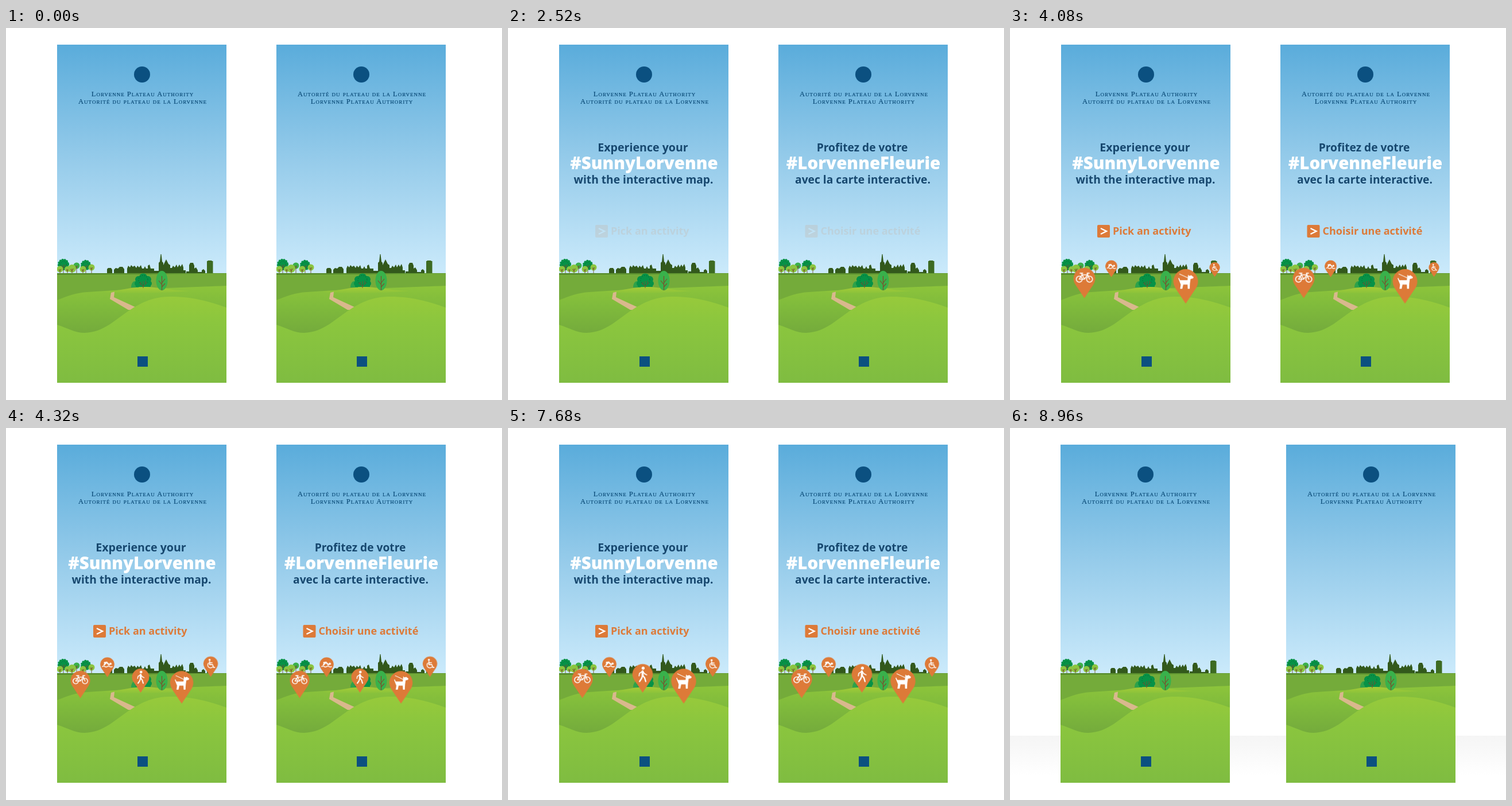
An HTML page for the animation above (10 s loop, 864 by 648 pixels).

```html
<!DOCTYPE html>
<html lang="en">
<head>
<meta charset="utf-8">
<title>Interactive map banners</title>
<style>
html, body { margin: 0; width: 100%; height: 100%; overflow: hidden; background: #fff; }
svg { display: block; width: 864px; height: 648px; }
text { text-anchor: middle; font-family: "Open Sans", "Noto Sans", sans-serif; font-weight: 700; fill: #17486f; }
.head { font: 12.5px "Liberation Serif", "Noto Serif", serif; font-variant: small-caps; letter-spacing: 1px; fill: #0a4a77; stroke: #0a4a77; stroke-width: .2px; }
.tag { font-size: 29.5px; font-weight: 800; fill: #fff; }
.pick { font-size: 18px; text-anchor: start; fill: #dd7a38; }
.icon { fill: none; stroke: #fff; stroke-linecap: round; stroke-linejoin: round; }
.icon .solid { fill: #fff; stroke: none; }

.title, .button, .out, .in, .left, .right, .floor { animation: 10s step-end infinite both; }
.title { animation-name: title; }
.button { animation-name: button; }
.out { animation-name: out; }
.in { animation-name: pop; }
.left { animation-name: left; }
.right { animation-name: right; }
.floor { animation-name: floor; }

@keyframes title {
  0% { opacity: 0; }
  2% { opacity: 0; animation-timing-function: steps(8); }
  5.2% { opacity: 1; }
  76.8% { opacity: 1; animation-timing-function: steps(10); }
  80.8%, 100% { opacity: 0; }
}
@keyframes button {
  0% { opacity: 0; }
  24.8% { opacity: 0; animation-timing-function: steps(8); }
  28% { opacity: 1; }
  76.8% { opacity: 1; animation-timing-function: steps(10); }
  80.8%, 100% { opacity: 0; }
}
/* one 40 ms tick is .4% of the loop */
@keyframes pop {
  0% { transform: scale(0); }
  .4% { transform: scale(.3); }
  .8% { transform: scale(.58); }
  1.2% { transform: scale(.78); }
  1.6% { transform: scale(.9); }
  2% { transform: scale(1.03); }
  2.4% { transform: scale(1.09); }
  2.8% { transform: scale(1.11); }
  3.2% { transform: scale(1.11); }
  3.6% { transform: scale(1.09); }
  4% { transform: scale(1.06); }
  4.4% { transform: scale(1.03); }
  4.8%, 100% { transform: scale(1); }
}
@keyframes out {
  0% { transform: scale(0); }
  36.8% { transform: scale(1); }
  76.8% { transform: scale(1.07); }
  77.2% { transform: scale(1.11); }
  77.6% { transform: scale(1.1); }
  78% { transform: scale(1.05); }
  78.4% { transform: scale(.96); }
  78.8% { transform: scale(.84); }
  79.2% { transform: scale(.68); }
  79.6% { transform: scale(.48); }
  80% { transform: scale(.27); }
  80.4% { transform: scale(.1); }
  80.8%, 100% { transform: scale(0); }
}
@keyframes left { 0% { transform: none; } 89.6%, 100% { transform: translate(-1px, 0); } }
@keyframes right { 0% { transform: none; } 89.6%, 100% { transform: translate(10px, 0); } }
@keyframes floor { 0% { opacity: 0; } 89.6%, 100% { opacity: 1; } }
</style>
</head>
<body>
<svg viewBox="0 0 864 648">
  <defs>
    <linearGradient id="sky" gradientUnits="userSpaceOnUse" x1="0" y1="29" x2="0" y2="428">
      <stop stop-color="#5aacdb"/><stop offset=".5" stop-color="#95cbea"/><stop offset="1" stop-color="#cbeafb"/>
    </linearGradient>
    <linearGradient id="mid" gradientUnits="userSpaceOnUse" x1="0" y1="450" x2="0" y2="531">
      <stop stop-color="#8cc43b"/><stop offset=".4" stop-color="#80bb3c"/><stop offset="1" stop-color="#74ab3c"/>
    </linearGradient>
    <linearGradient id="near" gradientUnits="userSpaceOnUse" x1="0" y1="468" x2="0" y2="618">
      <stop stop-color="#97ca3b"/><stop offset=".3" stop-color="#8bc63e"/><stop offset="1" stop-color="#7fbc41"/>
    </linearGradient>
    <linearGradient id="knoll" gradientUnits="userSpaceOnUse" x1="0" y1="451" x2="0" y2="462">
      <stop stop-color="#a6cc36"/><stop offset="1" stop-color="#8ac23b"/>
    </linearGradient>
    <linearGradient id="ground" x1="0" y1="0" x2="0" y2="1">
      <stop stop-color="#f5f5f5"/><stop offset="1" stop-color="#fff"/>
    </linearGradient>
    <clipPath id="frame"><path d="M89 29H384V618H89Z"/></clipPath>

    <g id="scene" clip-path="url(#frame)">
      <path fill="url(#sky)" d="M89 29H384V430H89Z"/>
      <path fill="#33591c" d="M176 428V420L178 418H183L185 421V428ZM188 428V421L191 418L195 419L198 416H203L206 420V428Z
        M211 428V419L213 414L216 417L218 413L221 416L224 414L227 418L229 414L232 417L235 413L237 419H240L242 415L244 419H247V414L250 412L252 419H258V423H266
        V409L268 407L269.5 394H270.5L272 407L274 409V413L279 403L283 411L286 413V418H289L291 414L294 417L297 412L299 417L302 412L304 416L307 411L309 417V422H313V428Z
        M314 424H319V413L321 409H326L328 414V419L331 417L334 422V425H341V422L344 420L347 423V428H314Z"/>
      <path fill="#3d6b22" d="M350 428V406H351.500V405H358.500V406H360.500V428Z"/>
      <g id="grove"></g>
      <path fill="#74ab3a" d="M89 427H384V480H89Z"/>
      <path fill="#4d8029" d="M89 427.500H384V427.800L250 428.800L89 429.500Z"/>
      <path fill="url(#mid)" d="M89 474C107 467 122 461 142 460C210 455 310 452 384 449V535H89Z"/>
      <path fill="url(#knoll)" d="M170 460C205 456 222 451 245 451C270 452 285 457 320 458C270 463 220 463 170 460Z"/>
      <path fill="#d9b88d" d="M183 461L189 459.500L188 469L225 486L219 491H213L181 472Z"/>
      <path fill="url(#near)" d="M89 517C108 523 120 531 137 531C172 530 192 506 217 490.500C244 473 264 468 287 468C323 468 355 476 384 487V618H89Z"/>
      <g id="bushes"></g>
      <circle cx="237" cy="81" r="14" fill="#0b5080"/>
      <path fill="#0b5080" d="M229 572h18v18h-18z"/>
    </g>
  </defs>
  <rect class="floor" y="536" width="864" height="70" fill="url(#ground)"/>
  <g id="panels"></g>
</svg>
<script>
const byId = id => document.getElementById(id);
const GREENS = { dark: '#079247', mid: '#3bb04a', light: '#8cc540' };

// a round crown; dark ones get a scalloped rim and leaf flecks
function tree(x, y, r, tone, foot) {
  const c = GREENS[tone];
  const trunk = `M${x} ${foot}V${y}M${x} ${y + r * .6}l${r * .4} ${-r * .6}M${x} ${y + r * .7}l${-r * .4} ${-r * .6}`;
  const rim = tone === 'dark'
    ? `<circle cx="${x}" cy="${y}" r="${r - 2}" fill="${c}" stroke="${c}" stroke-width="4.400" stroke-linecap="round" stroke-dasharray="0 4"/>
       <circle cx="${x}" cy="${y}" r="${r * .55}" fill="none" stroke="#057339" stroke-width="1.400" stroke-linecap="round" stroke-dasharray="0 3"/>`
    : `<circle cx="${x}" cy="${y}" r="${r}" fill="${c}"/>`;
  return `${rim}<path d="${trunk}" fill="none" stroke="#75502c" stroke-width=".9"/>`;
}

byId('grove').innerHTML =
  tree(123, 414, 5.5, 'mid', 428) + tree(100, 412, 10, 'dark', 428) + tree(139, 413, 9, 'dark', 428) +
  tree(94, 420, 5.5, 'light', 428) + tree(107, 420, 5, 'light', 428) + tree(115, 419, 7, 'light', 428) +
  tree(134, 420, 5.5, 'light', 428) + tree(149, 417, 5.5, 'light', 428);

byId('bushes').innerHTML = `
  <path fill="#2da24a" d="M218 452C218 444 222 441 225 441C229 441 231 446 231 452Z"/>
  <g fill="${GREENS.dark}"><circle cx="239" cy="435" r="7.500"/><circle cx="231" cy="438" r="6"/><circle cx="247" cy="438" r="6"/>
  <circle cx="229" cy="445" r="5"/><circle cx="249" cy="445" r="5"/><path d="M226 440H252V451H226Z"/></g>
  <circle cx="239" cy="439" r="8" fill="none" stroke="#057339" stroke-width="1.600" stroke-linecap="round" stroke-dasharray="0 4"/>
  <path fill="none" stroke="#7a5030" stroke-width=".9" d="M239 453V441M239 450L232 444M239 450L246 443M235 447V442M243 446V440"/>
  <ellipse cx="271.500" cy="440" rx="10" ry="17" fill="#39b14b"/>
  <path fill="none" stroke="#7d4f2d" stroke-width="1.200" d="M271.500 457V432M271.500 447L266 440M271.500 444L277 437M271.500 451L277 445"/>`;

const ICONS = {
  dog: `<path class="solid" d="M-11-42L-9-38H3L4-47L6-45L9-46L13-43L12-41L8-40L7-33L6.500-24H3.500L3-31H-4L-5.500-24H-9L-8-31L-10-36L-12-41Z"/>
    <path stroke-width="1" d="M-10-48L3-42"/>`,
  bike: `<g stroke-width="1.700"><circle cx="-9.500" cy="-35" r="5.500"/><circle cx="9.500" cy="-35" r="5.500"/>
    <path d="M-9.500-35L-4.500-43H6L0-35H-9.500M0-35L-5.500-46M-8-46H-3M9.500-35L5-46H9"/></g>`,
  swim: `<circle class="solid" cx="9" cy="-38" r="3.200"/><path stroke-width="4" d="M-9-35L-2-42L5-35M-2-42L-8-41"/>
    <path stroke-width="2.200" d="M-14-30q3.500-3 7 0t7 0t7 0t7 0"/>`,
  chair: `<circle class="solid" cx="-3" cy="-47" r="2.800"/><path stroke-width="2.600" d="M-3-43V-34H5L8-26H11M-3-39H4"/>
    <path stroke-width="2.200" d="M-6-38A7.500 7.500 0 1 0 5-27"/>`,
  walk: `<circle class="solid" cx="1" cy="-48" r="2.900"/><path stroke-width="4" d="M0-42V-34"/>
    <path stroke-width="2.600" d="M0-34L-2-28L-6-22M0-34L4-29L6-22"/><path stroke-width="2" d="M0-42L-6-38L-7-33M0-42L4-37L8-35"/>`
};

// icon, tip x, tip y, size, start in seconds
const PINS = [
  ['swim', 176.5, 434, .58, 3.92],
  ['chair', 356.5, 433.5, .58, 3.96],
  ['walk', 234.5, 461, .83, 4.16],
  ['bike', 129.5, 470.5, .85, 3.8],
  ['dog', 306, 480, 1.01, 3.68]
];

const pin = ([icon, x, y, size, start]) => `
  <g transform="translate(${x} ${y}) scale(${size})"><g class="out"><g class="in" style="animation-delay:${start}s">
    <path fill="#dd7a38" d="M0 0L-16.600-24.900A20 20 0 1 1 16.600-24.900Z"/><g class="icon">${ICONS[icon]}</g>
  </g></g></g>`;

const line = (x, y, words, attrs) => `<text x="${x}" y="${y}" ${attrs}>${words}</text>`;

const panel = p => `
  <g transform="translate(${p.x} 0)"><g class="${p.side}">
    <use href="#scene"/>
    ${p.head.map((words, i) => line(238, 119 + i * 12.5, words, 'class="head"')).join('')}
    <g class="title">
      ${line(235, 215, p.top, `font-size="${p.size}"`)}
      ${line(237, 246, p.tag, 'class="tag"')}
      ${line(236, 271, p.end, 'font-size="19.200"')}
    </g>
    <g class="button">
      <rect x="${p.box}" y="343" width="22" height="22" rx="2" fill="#dd7a38"/>
      <path d="M${p.box + 6} 349l10 5l-10 5" fill="none" stroke="#fff" stroke-width="2.400"/>
      <text class="pick" x="${p.box + 27}" y="360">${p.pick}</text>
    </g>
    ${PINS.map(pin).join('')}
  </g></g>`;

const english = 'Lorvenne Plateau Authority';
const french = 'Autorité du plateau de la Lorvenne';

byId('panels').innerHTML = [
  { x: 0, side: 'left', head: [english, french], top: 'Experience your', size: 19.6, tag: '#SunnyLorvenne',
    end: 'with the interactive map.', box: 152, pick: 'Pick an activity' },
  { x: 382, side: 'right', head: [french, english], top: 'Profitez de votre', size: 19.2, tag: '#LorvenneFleurie',
    end: 'avec la carte interactive.', box: 135.5, pick: 'Choisir une activité' }
].map(panel).join('');
</script>
</body>
</html>
```
